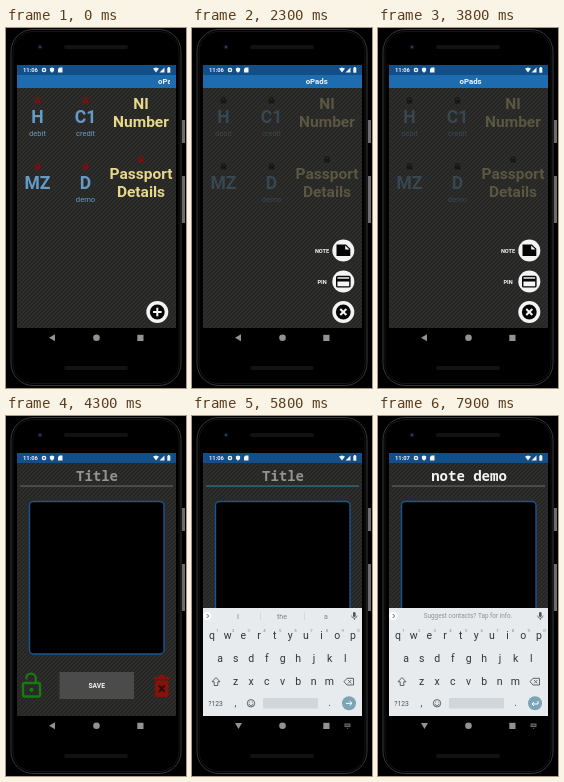
An HTML page with a canvas for the animation above (8000 ms loop, 180 by 360 pixels).

```html
<!DOCTYPE html>
<html lang="en">
<head>
<meta charset="utf-8">
<title>Notes app demo</title>
<style>
html, body { margin: 0; width: 100%; height: 100%; overflow: hidden; background: #000; }
canvas { display: block; width: 180px; height: 360px; }
</style>
</head>
<body>
<canvas id="stage"></canvas>
<script>
const LOOP = 8000;
const canvas = document.getElementById('stage');
const dpr = window.devicePixelRatio || 1;
canvas.width = 180 * dpr;
canvas.height = 360 * dpr;
const c = canvas.getContext('2d');
const SANS = 'Roboto, sans-serif';
const MONO = '"Noto Sans Mono", monospace';
const WHITE = '#f4f4f4';

const clamp = v => Math.max(0, Math.min(1, v));
const ramp = (t, a, b) => clamp((t - a) / (b - a));
const mix = (a, b, p) => a + (b - a) * p;
const easeOut = p => 1 - (1 - p) ** 2;
const easeInOut = p => p * p * (3 - 2 * p);

function text(s, x, y, size, color, weight = 400, family = SANS, align = 'center') {
  c.font = `${weight} ${size}px ${family}`;
  c.textAlign = align;
  c.fillStyle = color;
  c.fillText(s, x, y);
}
function rect(x, y, w, h, color) {
  c.fillStyle = color;
  c.fillRect(x, y, w, h);
}
function round(x, y, w, h, r) {
  c.beginPath();
  c.roundRect(x, y, w, h, r);
}
function fill(color) { c.fillStyle = color; c.fill(); }
function stroke(color, width = 1) { c.strokeStyle = color; c.lineWidth = width; c.stroke(); }
function circle(x, y, r, color) {
  c.beginPath();
  c.arc(x, y, r, 0, 7);
  fill(color);
}
function path(points, close) {
  c.beginPath();
  for (let i = 0; i < points.length; i += 2) c.lineTo(points[i], points[i + 1]);
  if (close) c.closePath();
}

// Woven dark wallpaper
const tile = document.createElement('canvas');
tile.width = tile.height = 4;
const tc = tile.getContext('2d');
for (let y = 0; y < 4; y++) for (let x = 0; x < 4; x++) {
  tc.fillStyle = (x + y) % 4 < 2 ? '#2e2e2d' : '#252524';
  tc.fillRect(x, y, 1, 1);
}
const weave = c.createPattern(tile, 'repeat');

function phone() {
  rect(0, 0, 180, 360, '#000');
  round(5, 1.5, 170, 356, 22); stroke('#383838', 1);
  round(7, 3.5, 166, 352, 20); stroke('#141414', 1);
  for (const y of [17, 338]) { round(58, y, 64, 4, 2); fill('#121212'); }
  circle(34, 19, 2.5, '#0c121c');
  circle(34, 19, 1.1, '#2a4c78');
  rect(176, 92, 3, 23, '#6c6c6c');
  rect(176, 148, 3, 47, '#6c6c6c');
}

function statusBar(t) {
  rect(11, 37, 159, 10, '#124f88');
  text(t < 7500 ? '11:06' : '11:07', 17, 44.2, 5.8, WHITE, 700, SANS, 'left');
  circle(38, 42, 2.3, WHITE);
  circle(38, 42, 0.9, '#124f88');
  path([46, 39.4, 48.2, 40.3, 48, 43, 46, 44.8, 44, 43, 43.8, 40.3], true); fill(WHITE);
  path([53.5, 39.5, 56.5, 39.5, 56.5, 44.5, 52, 44.5, 52, 41], true); fill(WHITE);
  path([147, 40.4, 150, 39.4, 153, 40.4, 150, 44.6], true); fill(WHITE);
  path([158.5, 39.5, 158.5, 44.5, 153.5, 44.5], true); fill(WHITE);
  rect(161.3, 39.8, 3, 4.9, WHITE);
  rect(162, 39, 1.6, 1, WHITE);
}

function navBar(typing) {
  const gray = '#929292';
  rect(11, 300, 159, 20, '#000');
  path(typing ? [43, 307, 50, 307, 46.5, 313] : [43, 309.8, 49, 306.3, 49, 313.3], true);
  fill(gray);
  circle(90.5, 309.8, 3.3, gray);
  rect(131.3, 306.8, 6.2, 6.2, gray);
  if (typing) {
    const dark = '#6a6a6a';
    rect(152.5, 307.5, 6, 3.6, dark);
    rect(153.5, 308.8, 4, 0.7, '#000');
    rect(155, 312, 1.2, 0.8, dark);
  }
}

function smallLock(x, y, color) {
  rect(x - 2.8, y - 0.5, 5.6, 4, color);
  c.beginPath(); c.arc(x, y - 0.5, 2, Math.PI, 0); stroke(color, 1.1);
}

function listItems(dim) {
  const blue = '#659bc7', yellow = '#e6d98c';
  const lock = `rgb(${mix(120, 26, dim)}, ${mix(16, 22, dim)}, ${mix(16, 22, dim)})`;
  const items = [[31.5, 95, 'H', 'debit'], [79.5, 95, 'C1', 'credit'],
                 [31.5, 161, 'MZ', ''], [79.5, 161, 'D', 'demo']];
  for (const [x, y] of items) smallLock(x, y - 23, lock);
  smallLock(135, 131, lock);
  c.save();
  c.globalAlpha *= mix(1, 0.26, dim);
  for (const [x, y, name, sub] of items) {
    text(name, x, y, 17.5, blue, 700);
    text(sub, x, y + 12.5, 7.6, blue);
  }
  text('NI', 135, 81, 15.5, yellow, 700);
  text('Number', 135, 99, 15.5, yellow, 700);
  text('Passport', 135, 151, 15.5, yellow, 700);
  text('Details', 135, 169, 15.5, yellow, 700);
  c.restore();
}

function noteIcon(y) {
  path([144.5, y - 6, 154, y - 6, 158.3, y - 1.7, 158.3, y + 5.5, 144.5, y + 5.5], true);
  fill('#050505');
  path([153.2, y - 5, 153.2, y - 1, 157.4, y - 1], true); fill(WHITE);
}
function cardIcon(y) {
  round(144.7, y - 5, 13.2, 10.4, 1); stroke('#050505', 1.4);
  rect(144.7, y - 2.8, 13.2, 2.8, '#050505');
}

function menu(open) {
  const entries = [['NOTE', 222.5, noteIcon], ['PIN', 253.5, cardIcon]];
  if (open > 0) for (const [label, top, icon] of entries) {
    const y = mix(284, top, open);
    circle(151.3, y, 11, WHITE);
    icon(y);
    c.save();
    c.globalAlpha *= clamp(open * 3);
    text(label, 130, y + 2, 5.6, WHITE, 700);
    c.restore();
  }
  circle(151.3, 284, 11, WHITE);
  circle(151.3, 284, 7.4, '#050505');
  c.save();
  c.translate(151.3, 284);
  c.rotate(open * Math.PI / 4);
  rect(-4.3, -1, 8.6, 2, WHITE);
  rect(-1, -4.3, 2, 8.6, WHITE);
  c.restore();
}

function listScreen(t) {
  rect(11, 47, 159, 253, weave);
  rect(11, 47, 159, 13, '#1e6cb0');
  c.save();
  c.beginPath(); c.rect(17, 47, 147, 13); c.clip();
  const x = t < 1400 ? mix(152, 133, t / 1400) : mix(133, 88, (t - 1400) / 2100);
  text('oPads', x, 56.3, 7.8, WHITE, 700, SANS, 'left');
  c.restore();
  listItems(ramp(t, 1250, 1400));
  menu(easeInOut(ramp(t, 1300, 1560)));
}

function typed(t) {
  if (t < 6550) return 'note '.slice(0, Math.max(0, Math.floor((t - 5900) / 110) + 1));
  return 'note ' + 'demo'.slice(0, Math.floor((t - 6550) / 220) + 1);
}

function openLock() {
  const green = '#197a12';
  round(17, 267, 17, 13.5, 1.5); stroke(green, 2.4);
  c.beginPath(); c.moveTo(20, 262.5);
  c.arc(25, 262.5, 4.8, Math.PI, 0);
  c.lineTo(29.8, 267); stroke(green, 2.3);
  circle(25.5, 273.8, 2.1, green);
}

function trash() {
  const red = '#861309';
  rect(148, 261, 15.5, 2.4, red);
  rect(152.5, 259, 6.5, 2.5, red);
  round(149, 264.5, 13.5, 16.5, 1.5); fill(red);
  path([153, 269.5, 158.7, 275.8]); stroke('#251210', 1.9);
  path([158.7, 269.5, 153, 275.8]); stroke('#251210', 1.9);
}

function editorScreen(t) {
  const focused = t >= 4800 && t < 7550;
  const resized = t >= 5500;
  const title = typed(t);
  rect(11, 47, 159, 253, weave);
  text(title || 'Title', 91, 65, 14, title ? WHITE : '#939393', 700, MONO);
  rect(14, 69.5, 153, 1.1, focused ? '#3b7999' : '#666');
  if (focused && title) rect(91.2 + title.length * 4.2, 51, 1, 18, '#327dac');
  c.save();
  if (resized) { c.beginPath(); c.rect(11, 75, 159, 117); c.clip(); }
  round(23.5, 85.5, 134.5, 152.5, 4); fill('#000'); stroke('#165692', 1.4);
  c.restore();
  if (!resized) {
    rect(53.5, 256, 74.5, 27, '#4b4b4b');
    text('SAVE', 90.7, 272.2, 6.7, WHITE, 700);
    openLock();
    trash();
  }
}

function keyRow(keys, x, y) {
  [...keys].forEach((key, i) => text(key, x + i * 15.65, y, 10.5, '#30363a'));
}

function suggestions(title) {
  if (title.length < 5) return ['I', 'the', 'a'];
  if (title.length < 7) return ['d', 'do', 'did'];
  return ['dem', 'demo', 'demand'];
}

function keyboard(t) {
  const ink = '#4d565b';
  const noteFocused = t >= 7550;
  c.save();
  c.beginPath(); c.rect(11, 192, 159, 108); c.clip();
  c.translate(0, mix(108, 0, easeOut(ramp(t, 5650, 5800))));
  rect(11, 192, 159, 108, '#e7ebed');
  circle(15.5, 200, 4.2, '#fff');
  path([14.7, 198, 16.7, 200, 14.7, 202]); stroke(ink, 0.9);
  if (noteFocused) {
    text('Suggest contacts? Tap for info.', 90, 202.4, 6.4, '#8b9499');
  } else {
    suggestions(typed(t)).forEach((word, i) => text(word, 46 + i * 44, 202.6, 7, '#788187'));
    for (const x of [68, 112]) rect(x, 196.5, 0.6, 7.5, '#c5cccf');
  }
  round(161, 196, 2.6, 5, 1.3); fill(ink);
  c.beginPath(); c.arc(162.3, 199.5, 2.7, 0, Math.PI); stroke(ink, 0.7);
  rect(161.9, 202, 0.8, 2, ink);

  keyRow('qwertyuiop', 20, 222.5);
  [...'1234567890'].forEach((n, i) => text(n, 25.5 + i * 15.65, 215.6, 4.2, '#7a858a'));
  keyRow('asdfghjkl', 28, 246);
  keyRow('zxcvbnm', 43.5, 269);
  path([24, 261.5, 28, 265.8, 25.8, 265.8, 25.8, 269.5, 22.2, 269.5, 22.2, 265.8, 20, 265.8], true);
  stroke(ink, 0.9);
  path([152, 265.7, 155, 262.3, 161.5, 262.3, 161.5, 269, 155, 269], true); stroke(ink, 0.9);
  path([156, 264, 159.4, 267.4]); stroke(ink, 0.8);
  path([159.4, 264, 156, 267.4]); stroke(ink, 0.8);
  text('?123', 23.5, 289.8, 6.8, ink);
  text(',', 43.5, 289.5, 10, ink);
  text('.', 137.5, 289.5, 10, ink);
  c.beginPath(); c.arc(59, 287.3, 3.7, 0, 7); stroke(ink, 0.9);
  c.beginPath(); c.arc(59, 287.6, 2, 0, Math.PI); stroke(ink, 0.7);
  circle(57.7, 286, 0.5, ink);
  circle(60.3, 286, 0.5, ink);
  round(71, 282, 55, 10.5, 1); fill('#d0d6d9');
  circle(157, 287.3, 7, '#7ba4b6');
  if (noteFocused) {
    path([160, 285, 160, 288, 154, 288]); stroke('#fff', 1);
    path([156, 286, 154, 288, 156, 290]); stroke('#fff', 1);
  } else {
    path([154, 287.3, 160, 287.3]); stroke('#fff', 1);
    path([157.7, 285, 160, 287.3, 157.7, 289.6]); stroke('#fff', 1);
  }
  c.restore();
}

function draw(t) {
  c.setTransform(dpr, 0, 0, dpr, 0, 0);
  phone();
  const change = ramp(t, 3850, 4050);
  if (change < 1) listScreen(t);
  if (change > 0) {
    c.save();
    c.globalAlpha = change;
    editorScreen(t);
    c.restore();
  }
  statusBar(t);
  if (t > 5650) keyboard(t);
  navBar(t >= 5500);
}

function frame(now) {
  draw(now % LOOP);
  requestAnimationFrame(frame);
}
requestAnimationFrame(frame);
</script>
</body>
</html>
```
